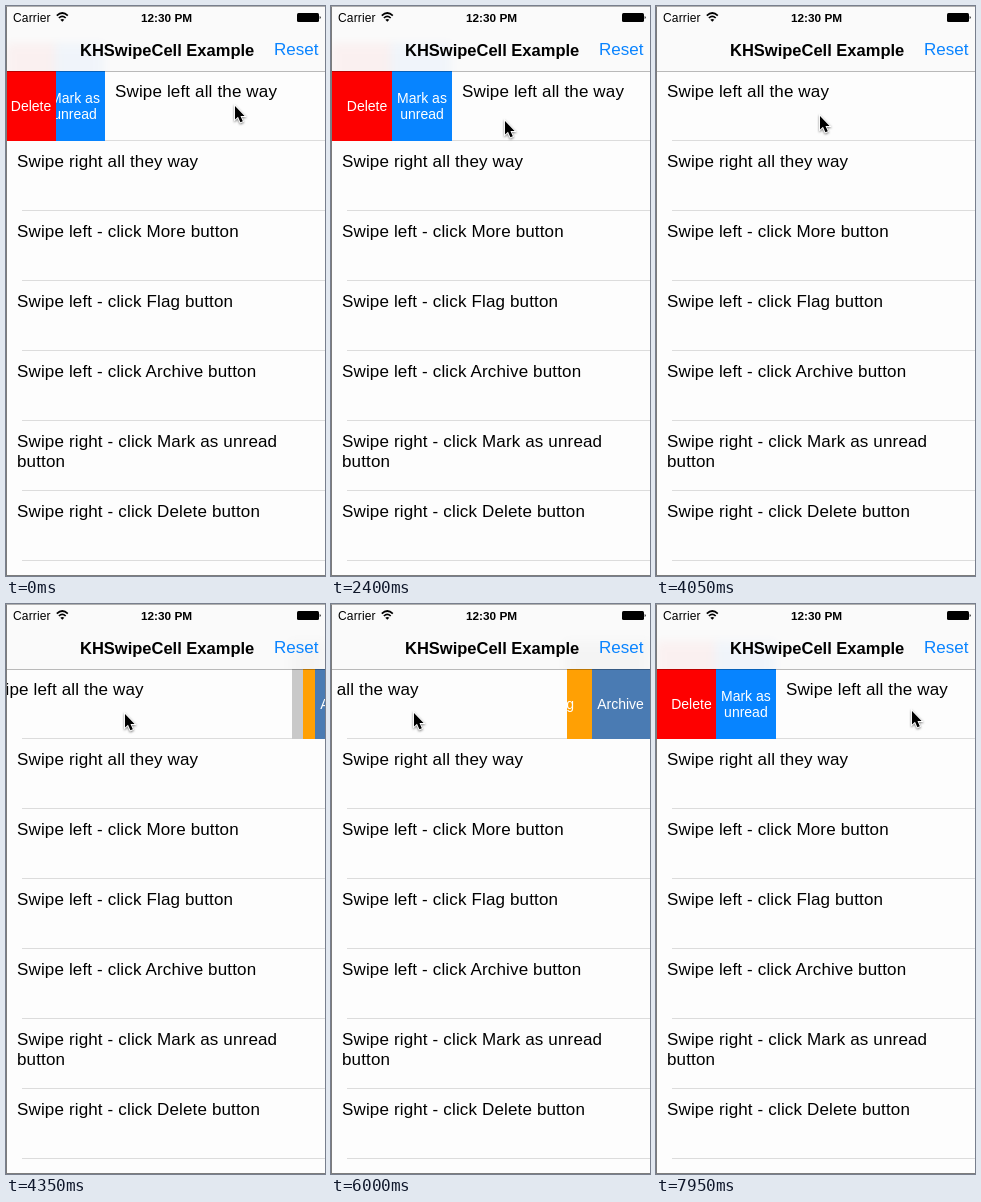
Animation of 319x570 px, one loop 8 s. Source, as an HTML page:

```html
<!DOCTYPE html>
<html lang="en">
<head>
<meta charset="utf-8">
<title>Swipe cell demo</title>
<style>
  html, body { margin: 0; width: 100%; height: 100%; overflow: hidden; }
  body { font: 17px/20px "Liberation Sans", Arial, sans-serif; color: #000; }
  #stage { position: relative; width: 319px; height: 570px; overflow: hidden; background: #fdfdfd; }
  #stage div, #stage svg, .label { position: absolute; }
  #stage svg { overflow: visible; }
  .row { left: 1px; width: 320px; height: 70px; overflow: hidden; letter-spacing: .15px; }
  .row::after { content: ""; position: absolute; z-index: -1; left: 15px; right: 0; top: 69px; height: 1px; background: #dcdcdc; }
  .row { isolation: isolate; }
  .text { left: 10px; top: 11px; width: 295px; }
  #cell { top: 0; width: 320px; height: 70px; background: linear-gradient(#dcdcdc, #dcdcdc) no-repeat 0 69px / 200% 1px #fdfdfd; }
  .button { top: 0; width: 64px; height: 70px; color: #fff; font-size: 14px; line-height: 16px; letter-spacing: 0; }
  .label { top: 50%; transform: translateY(-50%); text-align: center; }
  #nav { left: 0; top: 0; width: 319px; height: 65px; background: #fafafa; overflow: hidden; white-space: nowrap; }
  #line { left: 0; top: 65px; width: 319px; height: 1px; background: rgba(0, 0, 0, .27); }
  .tint { top: 37px; height: 40px; filter: blur(5px); opacity: .035; }
  #edge { left: 0; top: 0; width: 318px; height: 568px; border: solid #7d7d7d; border-width: 1px 0 1px 1px; border-top-color: #b0b0b0; }
  #cursor { filter: drop-shadow(0 1px 1px rgba(0, 0, 0, .5)); }
</style>
</head>
<body>
<div id="stage">
  <div id="nav">
    <div class="tint" id="tintL" style="left:0;background:linear-gradient(90deg,#f00 50%,#07f 50%)"></div>
    <div class="tint" id="tintR" style="right:0;background:#777"></div>
    <div style="left:7px;top:2px;font-size:12px;letter-spacing:.15px">Carrier</div>
    <svg style="left:50px;top:6px" width="13" height="10" fill="none" stroke="#000" stroke-width="1.7">
      <path d="M.8 3.7Q6.3-1.7 11.8 3.7M2.9 6Q6.3 2.7 9.7 6"/>
      <path d="M6.3 9.8L4.3 7.7Q6.3 6.2 8.3 7.7Z" fill="#000" stroke="none"/>
    </svg>
    <div style="left:135px;top:2px;font-size:11.8px;font-weight:bold">12:30 PM</div>
    <svg style="left:291px;top:7px" width="25" height="10">
      <rect width="22" height="9" rx="1.5"/>
      <path d="M22.7 3Q24.8 4.5 22.7 6Z"/>
    </svg>
    <div style="left:74px;top:34px;font-size:16.5px;font-weight:bold">KHSwipeCell Example</div>
    <div style="left:268px;top:34px;color:#0a84ff">Reset</div>
  </div>
  <div id="line"></div>
  <div id="edge"></div>
  <svg id="cursor" width="12" height="18">
    <path d="M0 0V13.5L3 10.8L5.4 16.3L7.8 15.3L5.5 10H9.6Z" stroke="#fff" stroke-width="1.8" paint-order="stroke"/>
  </svg>
</div>
<script>
const LOOP = 8000, STEP = 150, CELL = 320;
const $ = id => document.getElementById(id);

function add(parent, className, text = "") {
  const el = document.createElement("div");
  el.className = className;
  el.textContent = text;
  parent.append(el);
  return el;
}

const rows = [
  "Swipe left all the way", "Swipe right all they way",
  "Swipe left - click More button", "Swipe left - click Flag button",
  "Swipe left - click Archive button", "Swipe right - click Mark as unread button",
  "Swipe right - click Delete button"
].map((text, i) => {
  const row = add($("stage"), "row");
  row.style.top = 65 + 70 * i + "px";
  if (i) add(row, "text", text);
  return row;
});

function button(text, color, side, labelWidth) {
  const el = add(rows[0], "button");
  el.style.background = color;
  const label = document.createElement("span");
  label.className = "label";
  label.textContent = text;
  label.style.width = labelWidth + "px";
  label.style[side] = 0;
  el.append(label);
  return el;
}

// Later buttons lie on top of earlier ones.
const leftButtons = [button("Mark as unread", "#0784ff", "right", 60), button("Delete", "#fe0000", "right", 50)];
const rightButtons = [button("More", "#c9c9c9", "left", 57), button("Flag", "#ffa004", "left", 57), button("Archive", "#4a7bb3", "left", 57)];
const cell = add(rows[0], "");
cell.id = "cell";
add(cell, "text", "Swipe left all the way");
$("stage").append($("line"), $("edge"), $("cursor"));

// Stops of the hand: time, x, y
const hand = [
  [0, 229, 99], [450, 187, 124], [750, 150, 117], [2100, 150, 117], [2850, 219, 109],
  [3420, 219, 108], [5100, 46, 110], [5550, 83, 108], [6000, 83, 108],
  [6600, 143, 105], [6850, 143, 105], [7350, 250, 105], [LOOP, 256, 106]
];

// Swipes and taps: time, cell offset
const swipe = [
  [0, 98], [300, 120], [3000, 120], [3340, 0], [4080, 0], [5030, -180],
  [5850, -180], [6140, 0], [6880, 0], [7480, 121], [7800, 121], [LOOP, 118.5]
];

function segment(keys, t) {
  const i = keys.findIndex(k => k[0] > t);
  const [a, b] = [keys[i - 1], keys[i]];
  const u = (t - a[0]) / (b[0] - a[0]);
  const ease = u * u * (3 - 2 * u);
  return { a, b, at: a.map((v, j) => v + (b[j] - v) * ease) };
}

function draw(now) {
  const t = Math.floor(now % LOOP / STEP) * STEP;
  const [, x, y] = segment(hand, t).at;
  const { a, b, at: [, dx] } = segment(swipe, t);
  // A closing cell slides over buttons that stay fully open.
  const spread = b[1] === 0 ? a[1] : dx;

  leftButtons.forEach((el, i) => el.style.left = Math.max(spread, 0) * (2 - i) / 2 - 64 + "px");
  rightButtons.forEach((el, i) => el.style.left = CELL + Math.min(spread, 0) * (3 - i) / 3 + "px");
  cell.style.left = dx + "px";
  cell.style.backgroundPositionX = 15 - dx + "px";
  $("tintL").style.width = Math.max(dx, 0) + "px";
  $("tintR").style.width = Math.max(-dx, 0) + "px";
  $("cursor").style.left = x + "px";
  $("cursor").style.top = y + 1 + "px";
  requestAnimationFrame(draw);
}
requestAnimationFrame(draw);
</script>
</body>
</html>
```
